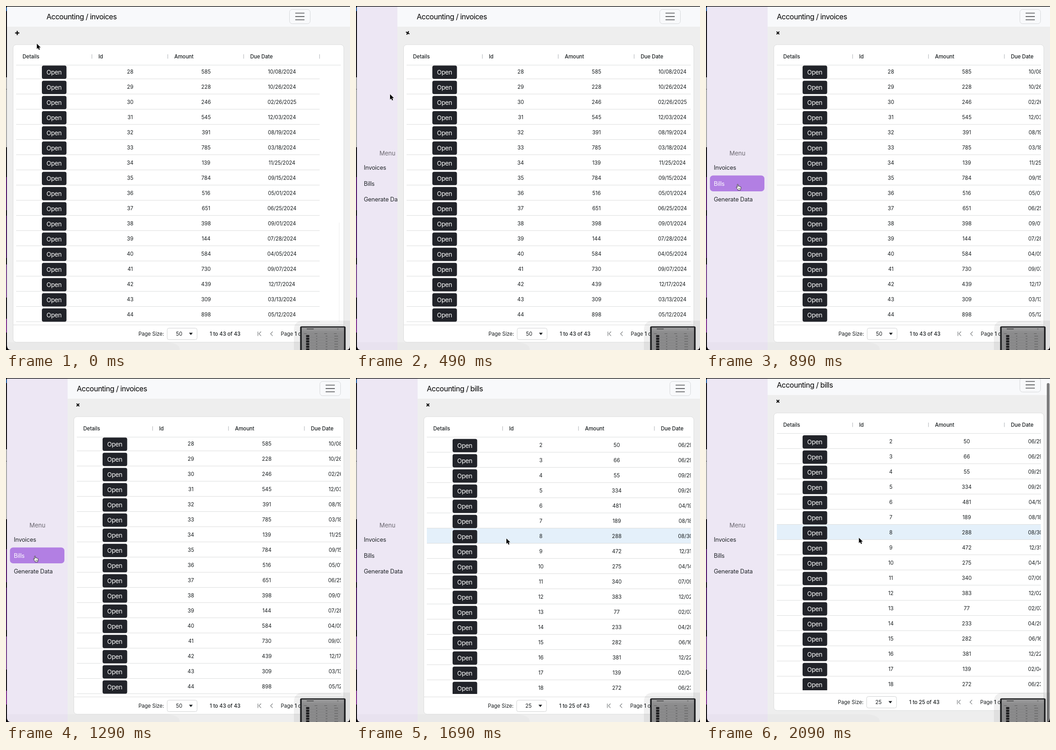
These frames come from a looping animation (748 px wide and 748 px high, 2.29 s). An HTML page:

```html
<!DOCTYPE html>
<html lang="en">
<head>
<meta charset="utf-8">
<title>Accounting</title>
<style>
  html, body { margin: 0; width: 100%; height: 100%; overflow: hidden; background: #000; }
  svg { display: block; width: 100vw; height: 100vh; }
  text { font-family: Inter, Roboto, "Open Sans", sans-serif; font-size: 11.3px; fill: #181d1f; }
  .title { font-size: 16px; letter-spacing: -.5px; fill: #000; }
  .head { font-size: 11.2px; font-weight: 500; }
  .mid { text-anchor: middle; }
  .date { letter-spacing: -.1px; }
  .open { font-size: 13.4px; letter-spacing: -.3px; fill: #fff; text-anchor: middle; }
  .pager { font-size: 11.2px; }
  .strong { font-weight: 500; }
  .menu { font-size: 13px; fill: #69666e; }
  .link { font-size: 12.8px; letter-spacing: -.2px; fill: #212529; }
  .link.on { fill: #fff; }
  .line { stroke: #dcdddd; }
  .icon { fill: none; stroke: #85888a; stroke-width: 1.3; }
</style>
</head>
<body>
<svg viewBox="0 0 748 748" id="stage"></svg>
<script>
const LOOP = 2290;
const PITCH = 33;
const OPEN_WIDTH = 132;

const invoices = {
  name: "invoices", first: 28, top: 125.4, size: 50, dx: 0,
  rows: `585 10/08/2024,228 10/26/2024,246 02/26/2025,545 12/03/2024,391 08/19/2024,785 03/18/2024,
    139 11/25/2024,784 09/15/2024,516 05/01/2024,651 06/25/2024,398 09/01/2024,144 07/28/2024,
    584 04/05/2024,730 09/07/2024,439 12/17/2024,309 03/13/2024,898 05/12/2024`
};
const bills = {
  name: "bills", first: 2, top: 128.4, size: 25, dx: -1.2,
  rows: `50 06/29/2024,66 06/29/2024,55 09/29/2024,334 09/20/2024,481 04/19/2024,189 08/18/2024,
    288 08/30/2024,472 12/31/2024,275 04/14/2024,340 07/09/2024,383 12/02/2024,77 02/07/2024,
    233 04/20/2024,282 06/16/2024,381 12/22/2024,139 02/04/2024,272 06/23/2024`
};

// Screen states; each holds until the next one starts.
const states = [
  { at: 0, cursor: "arrow", x: 67, y: 82, thumb: 1 },
  { at: 100, cursor: "hand", x: 25, y: 56, thumb: 1 },
  { at: 290, cursor: "hand", x: 25, y: 57, thumb: 1 },
  { at: 490, cursor: "arrow", x: 74, y: 192, side: 88 },
  { at: 690, cursor: "hand", x: 77.5, y: 366, side: OPEN_WIDTH, link: 0 },
  { at: 890, cursor: "hand", x: 65, y: 387, side: OPEN_WIDTH, link: 1 },
  { at: 1090, cursor: "hand", x: 59, y: 386.5, side: OPEN_WIDTH, link: 1 },
  { at: 1490, cursor: "arrow", x: 171, y: 380, side: OPEN_WIDTH, link: 1, bills: 1 },
  { at: 1690, cursor: "arrow", x: 327, y: 349, side: OPEN_WIDTH, bills: 1, row: 1 },
  { at: 1890, cursor: "arrow", x: 332.5, y: 347.5, side: OPEN_WIDTH, bills: 1, row: 1, bar: 1 },
  { at: 2090, cursor: "arrow", x: 332.5, y: 347.5, side: OPEN_WIDTH, bills: 1, row: 1, bar: 1, scroll: 8 }
];

const text = (x, y, str, cls = "") => `<text x="${x}" y="${y}" class="${cls}">${str}</text>`;
const rect = (x, y, w, h, fill, more = "") =>
  `<rect x="${x}" y="${y}" width="${w}" height="${h}" fill="${fill}" ${more}/>`;
const path = (d, more = "") => `<path d="${d}" ${more}/>`;
const times = (n, fn) => Array.from({ length: n }, (_, i) => fn(i)).join("");

function tableRows(list) {
  const hover = list === bills ? rect(22, list.top + 6 * PITCH, 900, PITCH, "#e4f0fa", 'id="hover"') : "";
  const body = list.rows.split(",").map((row, i) => {
    const [amount, date] = row.trim().split(" ");
    const y = list.top + i * PITCH;
    return path(`M22 ${y + PITCH}H682`, 'class="line"') +
      rect(78, y + 4, 53.5, 29, "#212329", 'rx="4"') +
      text(104.5, y + 23.7, "Open", "open") +
      text(270, y + 21.8, list.first + i, "mid") +
      text(435, y + 21.8, amount, "mid") +
      text(600, y + 21.8, date, "mid date");
  }).join("");
  return `<g id="${list.name}">${hover}${body}</g>`;
}

function pager(list) {
  return `<g id="${list.name}Pager" transform="translate(${list.dx} 0)">` +
    text(288, 717, "Page Size:", "pager") +
    rect(350.5, 700.5, 65, 25, "#fff", 'rx="4" stroke="#d0d2d3"') +
    text(369.5, 717, list.size) +
    path("M398 710.5h8l-4 5z", 'fill="#181d1f"') +
    text(443, 717, `1 to ${list.size === 50 ? 43 : 25} of 43`, "pager strong") +
    path("M547.7 708v9.4M554.6 708l-4.5 4.7l4.5 4.7M579.8 708l-4.5 4.7l4.5 4.7", 'class="icon"') +
    text(597.5, 717, 'Page <tspan class="strong">1</tspan> of <tspan class="strong">1</tspan>', "pager") +
    "</g>";
}

// Strip of desktop visible left of the window: [y, height, colour]
const desktop = [
  [3, 8, "#1c5aa0"], [155, 152, "#a5a5a5"], [180, 2, "#777"], [372, 72, "#4d1266"],
  [456, 92, "#3f0d58"], [562, 72, "#75418a"], [680, 30, "#7d2f8c"]
].map(([y, h, c]) => rect(0, y, 2, h, c)).join("");

const thumbnail =
  path("M626 748V704Q626 684 648 684H748V748Z", 'fill="#000" opacity=".06"') +
  rect(639.5, 696.5, 99, 60, "#1f2022", 'rx="3"') +
  rect(643, 699, 92, 50, "url(#glass)") +
  rect(643, 699, 92, 7, "#969697") +
  rect(654, 701.6, 15, 1.4, "#3a3a3a") + rect(720, 701, 3, 2.4, "#777") +
  rect(645, 710, 88, 40, "#8b8b8c") +
  times(4, i => rect([648, 671, 692, 713][i], 712, 6, 1, "#5d5d5d")) +
  times(6, i => {
    const y = 715.5 + i * 5.8;
    return rect(652.5, y, 7, 4.6, "#1d1d1f", 'rx=".8"') +
      rect(674, y + 1.8, 3, 1, "#555") + rect(695, y + 1.8, 4, 1, "#555") +
      rect(714, y + 1.8, 8, 1, "#555") + rect(646, y + 5, 80, .5, "#7b7b7b");
  });

document.getElementById("stage").innerHTML = `
  <defs>
    <linearGradient id="glass" x2="0" y2="1"><stop stop-color="#929293"/><stop offset="1" stop-color="#7d7d7e"/></linearGradient>
    <clipPath id="window">${path("M2 0H748V739Q748 748 739 748H12Q2 748 2 738Z")}</clipPath>
    <clipPath id="gridClip">${rect(0, 84, 728, 603, "#000")}</clipPath>
    <clipPath id="sideClip">${rect(2, 0, 0, 748, "#000", 'id="sideBox"')}</clipPath>
  </defs>
  ${rect(0, 0, 748, 748, "#08060a")}${desktop}
  <g clip-path="url(#window)">
    ${rect(2, 0, 746, 748, "#eeeeee")}
    <g id="page">
      ${rect(2, 0, 746, 45, "#f8f9fb")}
      <g id="nav">
        ${text(88, 28.8, 'Accounting / <tspan id="crumb"></tspan>', "title")}
        ${rect(616.5, 7.5, 45, 31, "none", 'rx="6" stroke="#d6d8da"')}
        ${path("M629 15.5h20M629 22.8h20M629 30h20", 'stroke="#505254" stroke-width="1.7"')}
      </g>
      ${path("M-4.6 0H4.6M0 -4.6V4.6", 'id="plus" stroke="#000" stroke-width="2.2"')}
      ${rect(15.5, 84, 719, 647, "#fff", 'id="card" rx="7" stroke="#dcdddd"')}
      <g clip-path="url(#gridClip)"><g id="grid">
        ${["Details", "Id", "Amount", "Due Date"].map((h, i) => text(36 + i * 165, 114, h, "head")).join("")}
        ${times(4, i => rect(186 + i * 165, 105, 1.4, 9.5, "#c3c6c9"))}
        ${path("M22 128.5H900", 'class="line"')}
        ${tableRows(invoices)}${tableRows(bills)}
      </g></g>
      ${path("M724.5 471V687", 'id="thumb" stroke="#ededed"')}
      ${path("M16 693.5H734", 'id="foot" class="line"')}
      ${pager(invoices)}${pager(bills)}
    </g>
    <g clip-path="url(#sideClip)">
      ${rect(2, 0, 132, 748, "#ede7f4")}
      ${rect(8.5, 334, 118.5, 34.5, "#b27fe3", 'id="mark" rx="7"')}
      ${text(51, 324.6, "Menu", "menu")}
      ${["Invoices", "Bills", "Generate Data"].map((s, i) => text(17, 356 + i * 34.5, s, "link")).join("")}
    </g>
    ${rect(741, 3, 6, 737, "#7b7b7c", 'id="bar" rx="3"')}
    ${path("M2 731H350Q378 733 378 748H2Z", 'fill="#000" opacity=".02"')}
    ${thumbnail}
  </g>
  ${rect(0, 0, 748, 1.4, "#0a0a0c")}
  ${path("M0 0V11.4L2.6 9L4.5 13.3L6.6 12.4L4.8 8.2H8.4Z",
    'id="arrow" fill="#000" stroke="#fff" stroke-width="1" stroke-linejoin="round" paint-order="stroke"')}
  <g id="hand" stroke="#222" stroke-width=".9" stroke-linejoin="round">
    ${path("M3 7.8V1.6Q3 .5 4 .5T5 1.6V5Q6.5 4 7 5.3Q8.6 4.5 9 5.9Q11 5.3 11 7.2V9.2Q11 10.6 10 11.8V13.5H4.2V12Q2.8 10.8 1.8 9.2L.8 7.7Q.4 6.6 1.4 6.5Q2.2 6.5 3 7.8Z", 'fill="#fff"')}
    ${path("M5.7 8.5v3M7.3 8.5v3M8.9 8.5v3", 'fill="none" stroke-width=".6"')}
  </g>`;

const el = id => document.getElementById(id);
const set = (id, key, value) => el(id).setAttribute(key, value);
const show = (id, on) => set(id, "visibility", on ? "visible" : "hidden");
const links = [...document.querySelectorAll(".link")];
let current;

function draw(time) {
  const state = states.findLast(s => s.at <= time);
  if (state === current) return;
  current = state;
  const { x, y, cursor, side = 0, scroll = 0, link = -1 } = state;
  const onBills = !!state.bills;

  set("page", "transform", `translate(0 ${-scroll})`);
  set("nav", "transform", `translate(${side / 2} 0)`);
  set("grid", "transform", `translate(${side} 0)`);
  set("plus", "transform", `translate(${24.4 + side} 58.6) rotate(${45 * side / OPEN_WIDTH}) scale(${1 - .1 * side / OPEN_WIDTH})`);
  set("card", "x", 15.5 + side);
  set("card", "width", 719 - side);
  set("foot", "d", `M${16 + side} 693.5H734`);
  set("sideBox", "width", side);
  el("crumb").textContent = onBills ? "bills" : "invoices";

  for (const list of [invoices, bills]) {
    const on = (list === bills) === onBills;
    show(list.name, on);
    show(list.name + "Pager", on);
  }
  show("hover", onBills && state.row);
  show("thumb", state.thumb);
  show("bar", state.bar);
  set("bar", "y", 3 + scroll);
  show("mark", link >= 0);
  set("mark", "y", 334 + Math.max(link, 0) * 34.5);
  links.forEach((node, i) => node.classList.toggle("on", i === link));

  for (const id of ["arrow", "hand"]) {
    show(id, id === cursor);
    set(id, "transform", `translate(${x} ${y})`);
  }
}

const start = performance.now();
function tick() {
  draw((performance.now() - start) % LOOP);
  requestAnimationFrame(tick);
}
tick();
</script>
</body>
</html>
```
